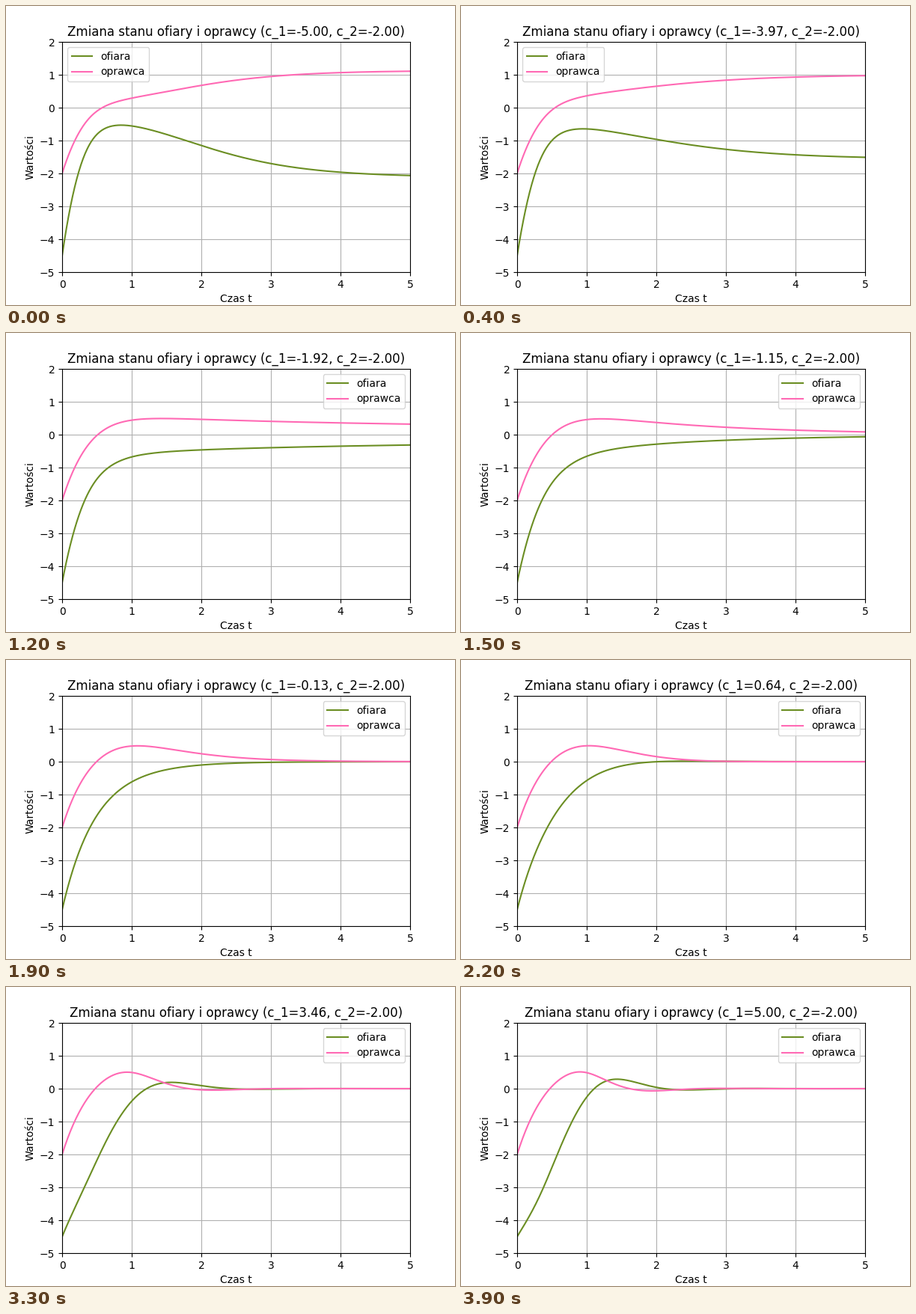
A matplotlib script for the animation above (4 s loop, 600 by 400 pixels).

```python
import numpy as np
import matplotlib.pyplot as plt
from matplotlib.animation import FuncAnimation

FRAMES = 40
INTERVAL = 100
DECAY = 2.0
C2 = -2.0
START = (-4.5, -2.0)

t = np.linspace(0, 5, 501)
c1_values = np.linspace(-5, 5, FRAMES)


def rate(state, c1):
    x, y = state
    return np.array([-DECAY * x + c1 * np.arctan(y),
                     -DECAY * y + C2 * np.arctan(x)])


def solve(c1):
    """Integrate the coupled system with RK4, for all c1 values at once."""
    h = t[1] - t[0]
    state = np.array([np.full_like(c1, v) for v in START])
    path = [state]
    for _ in t[1:]:
        k1 = rate(state, c1)
        k2 = rate(state + h / 2 * k1, c1)
        k3 = rate(state + h / 2 * k2, c1)
        k4 = rate(state + h * k3, c1)
        state = state + h / 6 * (k1 + 2 * k2 + 2 * k3 + k4)
        path.append(state)
    return np.array(path)


paths = solve(c1_values)

fig, ax = plt.subplots(figsize=(6, 4), dpi=100)
victim, = ax.plot([], [], color="olivedrab", label="ofiara")
culprit, = ax.plot([], [], color="hotpink", label="oprawca")
ax.set_xlim(0, 5)
ax.set_ylim(-5, 2)
ax.set_xlabel("Czas t")
ax.set_ylabel("Wartości")
ax.grid(True)
ax.legend(loc="best")


def update(i):
    victim.set_data(t, paths[:, 0, i])
    culprit.set_data(t, paths[:, 1, i])
    ax.set_title("Zmiana stanu ofiary i oprawcy "
                 f"(c_1={c1_values[i]:.2f}, c_2={C2:.2f})")
    return victim, culprit


anim = FuncAnimation(fig, update, frames=FRAMES, interval=INTERVAL,
                     init_func=lambda: update(0), repeat=True, repeat_delay=0)
plt.show()
```
